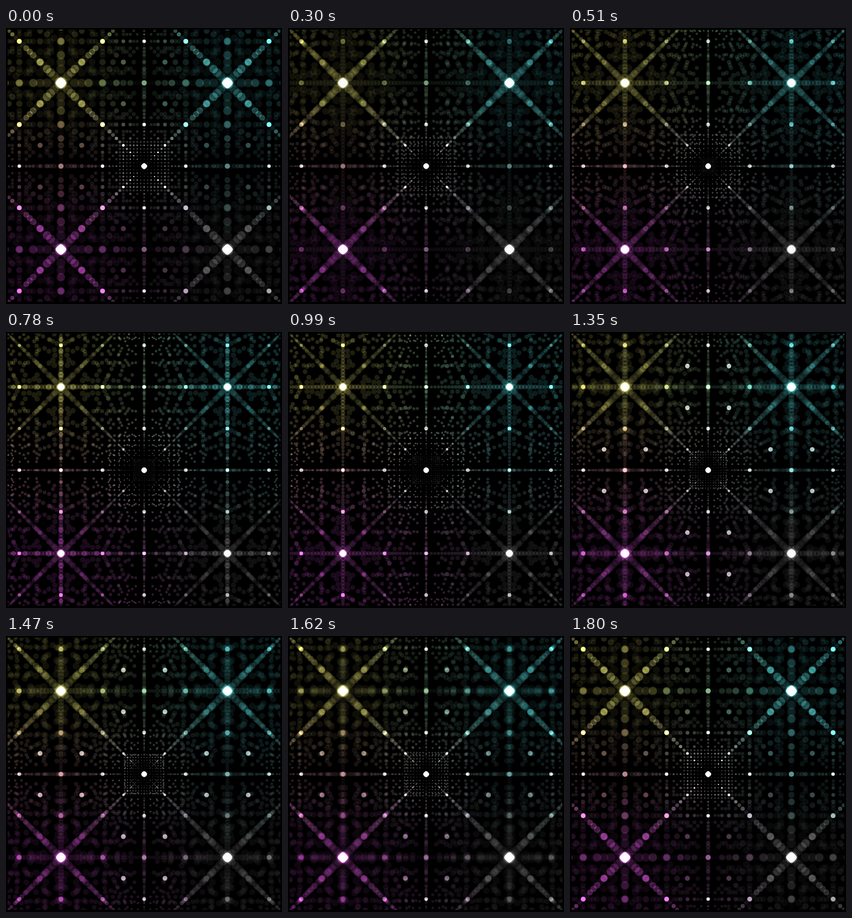
An HTML page with a canvas that plays this animation: 500 px wide and 500 px high, repeating every 1.83 s.

```html
<!DOCTYPE html>
<html lang="en">
<head>
<meta charset="utf-8">
<title>Dot lattice</title>
<style>
  html, body { margin: 0; width: 100%; height: 100%; overflow: hidden; background: #000; }
  canvas { display: block; width: 500px; height: 500px; }
</style>
</head>
<body>
<canvas id="stage" width="500" height="500"></canvas>
<script>
const ctx = document.getElementById('stage').getContext('2d');
const LOOP = 1830, STEP = 30;
const MID = 250.3, HALF = 150.8, LAYERS = 24, CAP = 7;
const TAU = Math.PI * 2;

// corner tints: top left, top right, bottom left, bottom right
const TINTS = [[222, 218, 105], [85, 215, 215], [208, 78, 208], [122, 122, 122]];
const clamp01 = v => Math.max(0, Math.min(1, v));

function tint(x, y, white = 0) {
  const a = clamp01((x - 130) / 240), b = clamp01((y - 130) / 240);
  const core = clamp01(1 - Math.hypot(x - MID, y - MID) / 120);
  const w = Math.max(white, core * 0.8);
  return [0, 1, 2].map(c => {
    const top = TINTS[0][c] * (1 - a) + TINTS[1][c] * a;
    const low = TINTS[2][c] * (1 - a) + TINTS[3][c] * a;
    const v = top * (1 - b) + low * b;
    return Math.round(v + (255 - v) * w);
  });
}

// colours on a coarse grid, reused by every dot
const tintCache = new Map();
function cachedTint(x, y, white) {
  const key = `${Math.round(x / 6)},${Math.round(y / 6)},${white}`;
  if (!tintCache.has(key)) tintCache.set(key, `rgb(${tint(x, y, white)})`);
  return tintCache.get(key);
}

function disc(x, y, r, alpha, white) {
  if (x < -r || y < -r || x > 500 + r || y > 500 + r) return;
  ctx.globalAlpha = alpha;
  ctx.fillStyle = cachedTint(x, y, white);
  ctx.beginPath();
  ctx.arc(x, y, r, 0, TAU);
  ctx.fill();
}

// repeat one offset through all mirrored tiles
function mirror(X, Y, r, alpha, white = 0) {
  const xs = X < 0.01 ? [0] : [X, -X];
  const ys = Y < 0.01 ? [0] : [Y, -Y];
  for (let a = -1; a <= 1; a++)
    for (let b = -1; b <= 1; b++)
      for (const dx of xs)
        for (const dy of ys)
          disc(MID + a * HALF * 2 + dx, MID + b * HALF * 2 + dy, r, alpha, white);
}

const both = (X, Y, r, alpha, white) => {
  mirror(X, Y, r, alpha, white);
  if (X !== Y) mirror(Y, X, r, alpha, white);
};

function lattice(phase, size, wave) {
  for (let k = 0; k < LAYERS; k++) {
    const s = HALF * (k + phase) / LAYERS;
    if (s < 0.5) continue;
    const grow = Math.min(1, k + phase);
    for (let i = 0; i <= CAP && i * s <= HALF; i++) {
      for (let j = 0; j <= CAP && j * s <= HALF; j++) {
        if (!i && !j) continue;
        const X = i * s, Y = j * s;
        const r = Math.max(0.5, 0.03 * (X + Y) * size);
        const weight = i === j ? 0.75 + 0.3 * wave : i * j ? 0.72 : 0.4;
        mirror(X, Y, r, Math.min(0.55, 0.6 / size / r) * weight * grow);
      }
    }
  }
}

function crossArms(phase, size, wave) {
  const weight = 0.5 - 0.4 * wave;
  for (let k = 0; k < LAYERS; k++) {
    const Y = HALF * (k + phase) / LAYERS;
    both(HALF, Y, 0.024 * (HALF + Y) * size, 0.12 * weight);
  }
}

function nodes(size, wave, t) {
  const q = HALF / 4;
  const late = Math.pow(0.5 + 0.5 * Math.cos(TAU * (t - 1380) / LOOP), 3);
  const mid = 0.5 - 0.5 * wave;
  mirror(2 * q, 2 * q, 4.3 * size, 0.6, 0.15);
  both(2 * q, 0, 3.3, 0.85, 0.75);
  mirror(q, q, 2.3, 0.75, 0.8);
  both(q, 3 * q, 4.6 * Math.sqrt(size), 0.15 + 0.7 * late, 0.7 * late);
  mirror(3 * q, 3 * q, 6 * size, 0.3, 0);
  both(HALF, 2 * q, 5 * size, 0.05 + 0.55 * mid, 0.1);
  both(HALF, 0, 4.8 * size, 0.15 + 0.5 * mid, 0.2);
}

// bright core that relaxes from a soft diamond to a circle
function core(x, y, R, wave) {
  const a = R * (0.15 + 0.4 * Math.max(0, wave));
  ctx.fillStyle = ctx.strokeStyle = '#fff';
  ctx.lineJoin = 'round';
  ctx.lineWidth = 2 * (R - a);
  ctx.beginPath();
  ctx.moveTo(x, y - a);
  ctx.lineTo(x + a, y);
  ctx.lineTo(x, y + a);
  ctx.lineTo(x - a, y);
  ctx.closePath();
  ctx.fill();
  ctx.stroke();
}

function cores(size, wave) {
  for (const dx of [-HALF, HALF])
    for (const dy of [-HALF, HALF]) {
      const x = MID + dx, y = MID + dy, R = 9.6 * size;
      disc(x, y, R + 1.6, 0.45, 0);
      ctx.globalAlpha = 0.97;
      core(x, y, R, wave);
    }
  ctx.globalAlpha = 1;
  core(MID, MID, 5.3 - 0.5 * (1 - size), wave * 0.3);
}

function draw(t) {
  const phase = t / LOOP;
  const wave = Math.cos(TAU * phase);
  const size = 0.84 + 0.17 * wave;
  ctx.globalCompositeOperation = 'source-over';
  ctx.globalAlpha = 1;
  ctx.fillStyle = '#000';
  ctx.fillRect(0, 0, 500, 500);
  ctx.save();
  ctx.beginPath();
  ctx.rect(3, 3, 494, 493);
  ctx.clip();
  ctx.globalCompositeOperation = 'lighter';
  lattice(phase, size, wave);
  crossArms(phase, size, wave);
  nodes(size, wave, t);
  ctx.globalCompositeOperation = 'source-over';
  cores(size, wave);
  ctx.restore();
}

const start = performance.now();
let last = -1;
function tick() {
  const t = Math.floor((performance.now() - start) / STEP) * STEP % LOOP;
  if (t !== last) draw(last = t);
  requestAnimationFrame(tick);
}
tick();
</script>
</body>
</html>
```
